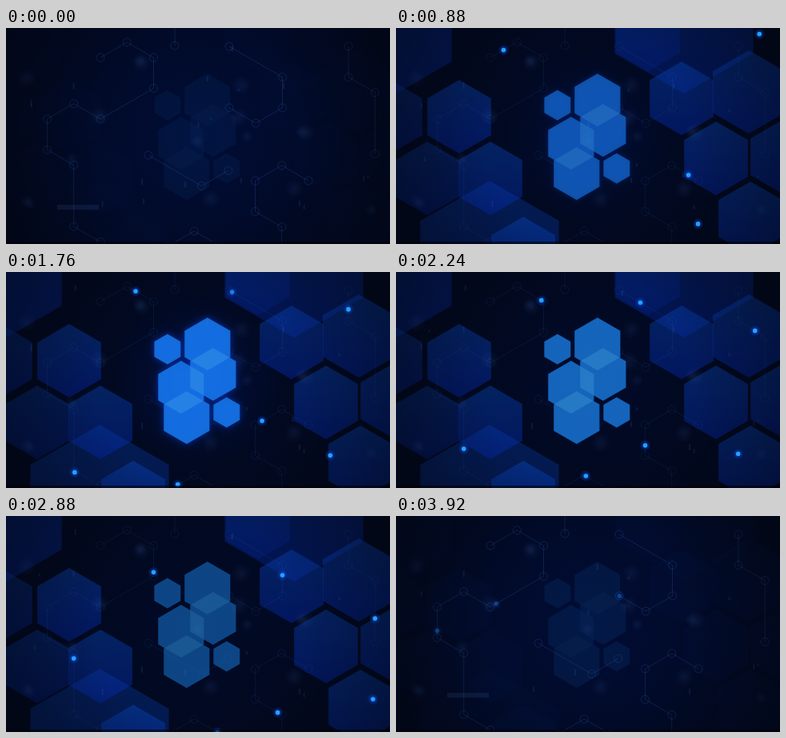
Recreate the animation shown at these times as an HTML page with a canvas. Size 480x270 px, loop 4 s.

```html
<!DOCTYPE html>
<html>
<head>
<meta charset="utf-8">
<style>
html, body { margin: 0; width: 100%; height: 100%; overflow: hidden; background: #020716; }
canvas { display: block; }
</style>
</head>
<body>
<canvas id="stage" width="480" height="270"></canvas>
<script>
const ctx = document.getElementById('stage').getContext('2d');
const LOOP = 4000, STEP = 80, EDGE = 38.4;

const clamp = u => Math.min(1, Math.max(0, u));
const smooth = u => u * u * (3 - 2 * u);
const accelerate = u => u * (.3 + .7 * u);

function random(n) {
  const s = Math.sin(n * 127.1 + 3.7) * 43758.5453;
  return s - Math.floor(s);
}

// Walks a hexagonal grid: 0 is up, each further digit turns 60 degrees clockwise.
function trace(x, y, turns) {
  const points = [[x, y]];
  for (const turn of turns) {
    const angle = turn * Math.PI / 3;
    x += EDGE * Math.sin(angle);
    y -= EDGE * Math.cos(angle);
    points.push([x, y]);
  }
  points.turns = turns;
  return points;
}

const bigWire = trace(118, 37, '123445432332');
const ring = trace(279, 23, '22345');
const hook = trace(378, 191, '54323');
const drop = trace(428, 23, '3233');
const peak = trace(202, 273, '12');
const wires = [bigWire, ring, hook, drop, peak, trace(211, 22, '0'), trace(178, 159, '221')];

const dots = [
  { path: bigWire, start: 0, time: 4000, travel: 190, ease: accelerate },
  { path: [[482, -9], ...drop], start: 0, time: 4000, travel: 323, ease: accelerate },
  { path: hook, start: 240, time: 3800, travel: 190, ease: smooth },
  { path: [[372, 248], [411, 226], [449, 229], [503, 229]], start: 360, time: 3900, travel: 130, ease: smooth },
  { path: trace(118, 269, '50050'), start: 620, time: 3800, travel: 172, ease: smooth },
  { path: ring, start: 1500, time: 3200, travel: 225, ease: smooth },
  { path: peak, start: 1200, time: 2000, travel: 77, ease: smooth }
];

const panels = [];
const addPanel = (x, y, r = 46, opacity = .42) => panels.push({ x, y, r, opacity });
for (const [x, y] of [[-17, -8], [360, -18], [117, 291]]) addPanel(x, y, 100, .32);
for (let i = 0; i < 2; i++) {
  addPanel(79 + 39 * i, 111 + 77 * i);
  addPanel(-7 + 46 * i, 111 + 77 * i, 46, .3);
}
for (let i = 0; i < 3; i++) addPanel(357 + 43 * i, 88 + 75 * i);
addPanel(441, 80, 52);
addPanel(483, 161);
addPanel(159, 282);
addPanel(315, 8, 46, .18);

// The cluster is symmetric about its centre.
const cluster = [];
for (const side of [1, -1])
  for (const [dx, dy, r] of [[13, -46, 33], [20, -8, 33], [-37, -39.5, 19]])
    cluster.push([238.8 + side * dx, 136 + side * dy, r]);

function along(path, distance) {
  for (let i = 1; i < path.length; i++) {
    const [x, y] = path[i - 1], dx = path[i][0] - x, dy = path[i][1] - y;
    const length = Math.hypot(dx, dy);
    if (distance <= length) return [x + dx * distance / length, y + dy * distance / length];
    distance -= length;
  }
  return null;
}

function addHexagon(x, y, r) {
  for (let i = 0; i < 6; i++) {
    const angle = i * Math.PI / 3, px = x + r * Math.sin(angle), py = y - r * Math.cos(angle);
    if (i) ctx.lineTo(px, py); else ctx.moveTo(px, py);
  }
  ctx.closePath();
}

function fillHexagons(list) {
  ctx.beginPath();
  list.forEach(h => addHexagon(...h));
  ctx.fill();
}

function disc(x, y, r, rgb, alpha) {
  const g = ctx.createRadialGradient(x, y, 0, x, y, r);
  g.addColorStop(0, `rgba(${rgb},${alpha})`);
  g.addColorStop(1, `rgba(${rgb},0)`);
  ctx.fillStyle = g;
  ctx.fillRect(x - r, y - r, 2 * r, 2 * r);
}

function drawPanels(level) {
  for (const { x, y, r, opacity } of panels) {
    const g = ctx.createLinearGradient(x, y - r, x, y + r);
    g.addColorStop(0, '#0846b8');
    g.addColorStop(1, '#0228b4');
    ctx.fillStyle = g;
    ctx.globalAlpha = opacity * level;
    fillHexagons([[x, y, r]]);
  }
  ctx.globalAlpha = 1;
}

function drawCluster(level, glow) {
  disc(239, 136, 105, '0,40,190', .2 * glow);
  ctx.fillStyle = `rgb(24,${116 + 8 * glow},${206 + 44 * glow})`;
  ctx.shadowColor = `rgba(0,70,255,${glow})`;
  ctx.shadowBlur = 14 * glow;
  ctx.globalAlpha = .86 * level;
  fillHexagons(cluster);
  ctx.shadowBlur = 0;

  // Overlaps read as lighter glass.
  ctx.fillStyle = '#6cd0f0';
  ctx.globalAlpha = .2 * level;
  cluster.forEach((a, i) => {
    ctx.save();
    ctx.beginPath();
    addHexagon(...a);
    ctx.clip();
    cluster.slice(i + 1).forEach(b => fillHexagons([b]));
    ctx.restore();
  });
  ctx.globalAlpha = 1;
}

function drawNetwork(dim) {
  ctx.strokeStyle = `rgba(55,100,175,${.14 + .12 * dim})`;
  for (const wire of wires) {
    ctx.beginPath();
    wire.forEach(p => ctx.lineTo(...p));
    wire.forEach(([x, y], i) => {
      if (wire.turns[i] === wire.turns[i - 1]) return;
      ctx.moveTo(x + 5, y);
      ctx.arc(x, y, 5, 0, 7);
    });
    ctx.stroke();
  }
  for (let i = 0; i < 16; i++)
    disc(20 + random(i) * 440, 40 + random(i + 40) * 210, 8 + 4 * (i % 2), '75,125,215', .1);
}

function drawMarks(t) {
  const beat = Math.floor(t / 160);
  ctx.fillStyle = 'rgba(85,130,200,.14)';
  if (t < 240 || t > 3800) ctx.fillRect(64, 221, 52, 6);
  for (let i = 0; i < 24; i++)
    if (random(i * 31 + beat) > .5)
      ctx.fillRect(25 + random(i) * 430, 15 + random(i + 50) * 225, 2, 3 + random(i + 90) * 5);
}

function drawDots(t) {
  const fade = clamp(t / 560) * clamp((4080 - t) / 560);
  for (const { path, start, time, travel, ease } of dots) {
    const u = clamp((t - start) / time);
    const point = along(path, travel * ease(u));
    const alpha = fade * clamp((u - .07) * 60);
    if (!point || !alpha) continue;
    const [x, y] = point;
    disc(x, y, 7, '0,80,255', .7 * alpha);
    ctx.fillStyle = `rgba(38,160,250,${alpha})`;
    ctx.beginPath();
    ctx.arc(x, y, 2.8, 0, 7);
    ctx.fill();
  }
}

function draw(t) {
  const left = LOOP - t;
  const level = .05 + .95 * smooth(clamp(Math.min(t, left) / 640));
  const clusterLevel = .09 + .91 * clamp(Math.min(t / 1250, left / 1800));
  const glow = Math.exp(-(((t - 1400) / 560) ** 2));

  ctx.fillStyle = '#020716';
  ctx.fillRect(0, 0, 480, 270);
  disc(240, 135, 290, '0,14,62', .45 + .4 * (1 - level));
  drawPanels(level);
  drawCluster(clusterLevel, glow);
  drawNetwork(1 - level);
  drawMarks(t);

  const shade = ctx.createRadialGradient(240, 135, 130, 240, 135, 290);
  shade.addColorStop(0, 'rgba(2,6,20,0)');
  shade.addColorStop(1, 'rgba(2,6,20,.5)');
  ctx.fillStyle = shade;
  ctx.fillRect(0, 0, 480, 270);
  drawDots(t);
  ctx.fillStyle = 'rgba(4,0,8,.6)';
  ctx.fillRect(0, 267, 480, 3);
}

function tick() {
  draw(Math.floor(performance.now() % LOOP / STEP) * STEP);
  requestAnimationFrame(tick);
}
tick();
</script>
</body>
</html>
```
